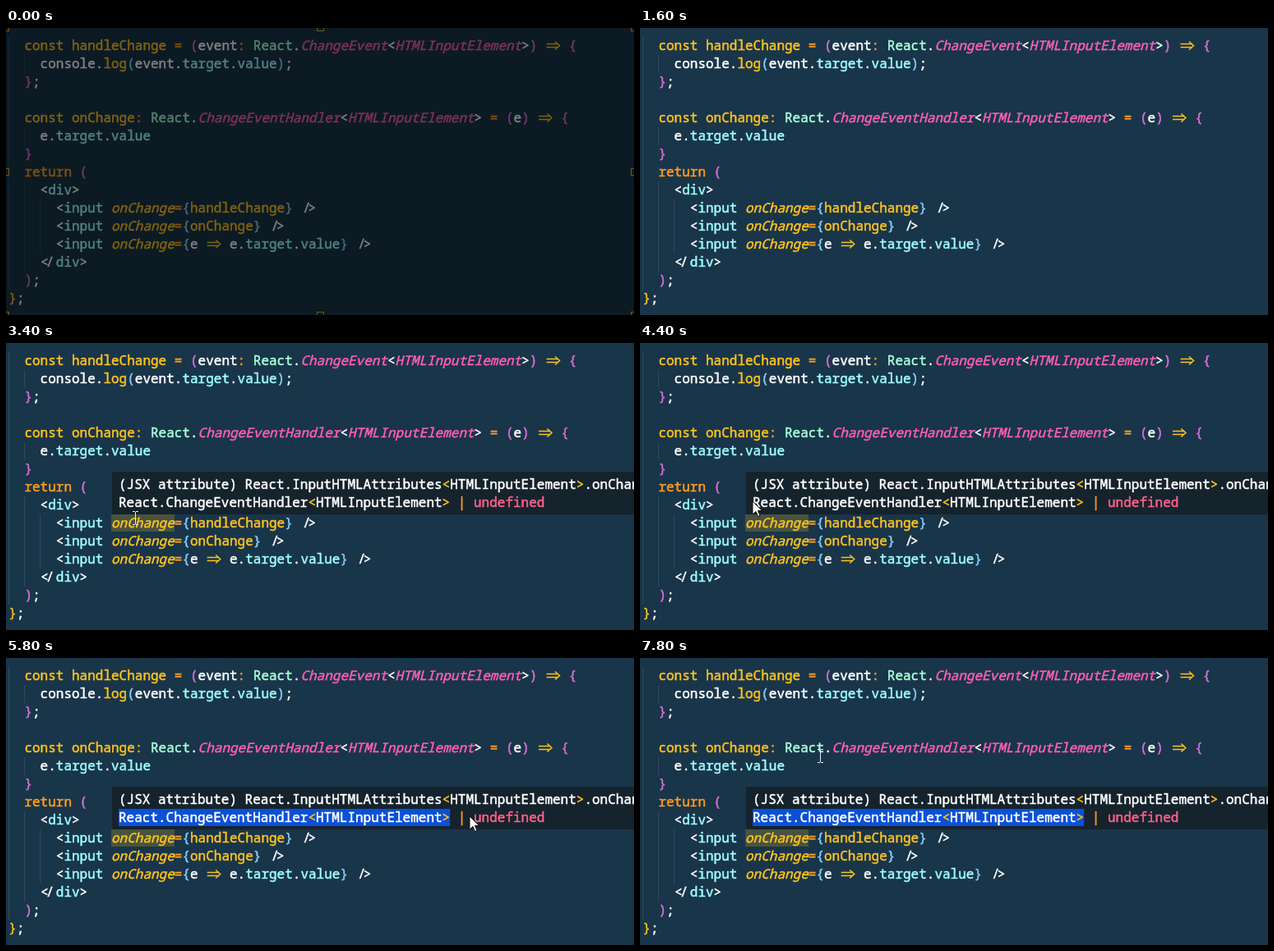
An HTML page with a canvas for the animation above (8000 ms loop, 764 by 350 pixels).

```html
<!DOCTYPE html>
<html lang="en">
<head>
<meta charset="utf-8">
<style>
html, body { margin: 0; width: 100%; height: 100%; overflow: hidden; background: #193549; }
canvas { display: block; }
</style>
</head>
<body>
<canvas id="stage" width="764" height="350"></canvas>
<script>
const ctx = document.getElementById('stage').getContext('2d');
const W = 764, H = 350, LOOP = 8000, STEP = 200;
const LEFT = 3.2, TOP = 11, CELL = 9.6, ROW = 22, BASE = 16;
const FONT = '500 16px "Noto Sans Mono", "DejaVu Sans Mono", monospace';

// Style letters used after "~" in the marked-up lines.
const COLORS = {
  w: '#ffffff', y: '#fec31e', o: '#ff9d1e', c: '#9effff', m: '#a8ffd8', p: '#da70d6',
  b: '#87cefa', t: '#fb5fb4', i: '#fec31e', r: '#ff628c'
};
const ITALIC = 'ti';

const CODE = [
  '  ~yconst handleChange ~o= ~p(~wevent~o: ~mReact~w.~tChangeEvent~w<~tHTMLInputElement~w>~p) ~y=> ~p{',
  '    ~wconsole.~ylog~b(~wevent.~ctarget~w.~cvalue~b)~w;',
  '  ~p}~w;',
  '  ',
  '  ~yconst onChange~o: ~mReact~w.~tChangeEventHandler~w<~tHTMLInputElement~w> ~o= ~p(~we~p) ~y=> ~p{',
  '    ~we.~ctarget~w.~cvalue',
  '  ~p}',
  '  ~oreturn ~p(',
  '    ~w<~cdiv~w>',
  '      ~w<~cinput ~ionChange~o=~b{~yhandleChange~b} ~w/>',
  '      ~w<~cinput ~ionChange~o=~b{~yonChange~b} ~w/>',
  '      ~w<~cinput ~ionChange~o=~b{~we ~y=> ~we.~ctarget~w.~cvalue~b} ~w/>',
  '    ~w</~cdiv~w>',
  '  ~p)~w;',
  '~y}~w;'
];
const TIP = [
  '~w(JSX attribute) React.InputHTMLAttributes~y<~wHTMLInputElement~y>~w.onChange',
  '~wReact.ChangeEventHandler~y<~wHTMLInputElement~y> ~o| ~rundefined'
];
const TIP_X = 137, TIP_Y = 162, SELECT_END = TIP_X + 42 * CELL;

const linear = u => u;
const smooth = u => u * u * (3 - 2 * u);
const easeOut = u => 1 - (1 - u) ** 2.1;

// Each move starts where the one before it ended; lift bends it upwards.
const MOVES = [
  { start: 1800, end: 2400, to: [157, 219], ease: linear },
  { start: 3200, end: 3400, to: [157, 213], ease: linear },
  { start: 3400, end: 4400, to: [137, 193], ease: easeOut },
  { start: 4600, end: 5600, to: [564, 193], ease: easeOut },
  { start: 6400, end: 7800, to: [219, 119], ease: smooth, lift: 90 }
];

function pointer(t) {
  let [x, y] = [330, 312];
  for (const { start, end, to, ease, lift = 0 } of MOVES) {
    const u = ease(Math.min(1, Math.max(0, (t - start) / (end - start))));
    x += (to[0] - x) * u;
    y += (to[1] - y) * u - lift * Math.sin(Math.PI * u);
  }
  return [x, y];
}

function rect(color, x, y, w, h) {
  ctx.fillStyle = color;
  ctx.fillRect(x, y, w, h);
}

function path(...points) {
  ctx.beginPath();
  points.forEach(([x, y]) => ctx.lineTo(x, y));
}

// A thin outline gives the text a medium weight.
function text(s, x, y) {
  ctx.lineWidth = 0.5;
  ctx.fillText(s, x, y);
  ctx.strokeText(s, x, y);
}

function arrow(x, y) {
  ctx.lineWidth = 1.5;
  for (const d of [-2, 2]) {
    path([x + 1.5, y + d], [x + 15.5, y + d]);
    ctx.stroke();
  }
  path([x + 12, y - 5], [x + 17.5, y], [x + 12, y + 5]);
  ctx.stroke();
}

function line(source, x, y) {
  for (const part of source.split(/(~\w|=>|<\/|\/>)/)) {
    if (part[0] === '~') {
      const style = part[1];
      ctx.fillStyle = ctx.strokeStyle = COLORS[style];
      ctx.font = (ITALIC.includes(style) ? 'italic ' : '') + FONT;
      continue;
    }
    if (part === '=>') {
      arrow(x, y - 5.5);
    } else if (part === '</' || part === '/>') {
      const nudge = c => c === '/' ? 2.5 : 0.5;
      text(part[0], x + nudge(part[0]), y);
      text(part[1], x + CELL - nudge(part[1]), y);
    } else {
      text(part, x, y);
    }
    x += part.length * CELL;
  }
}

function code() {
  CODE.forEach((s, i) => {
    const y = TOP + i * ROW;
    for (let col = 0; col < s.search(/\S|$/); col += 2)
      if (col < 6) rect('#31495a', Math.floor(LEFT + col * CELL), y, 1, ROW);
    line(s, LEFT, y + BASE);
  });
}

function tooltip(t) {
  ctx.globalAlpha = t < 2800 ? 0.18 : 1;
  rect('#15232d', 129, 157, W - 129, 52);
  if (t >= 4600) {
    const end = t < 5600 ? Math.min(SELECT_END, pointer(t)[0]) : SELECT_END;
    rect('#0a50d8', TIP_X, TIP_Y + ROW, end - TIP_X, 21);
  }
  TIP.forEach((s, i) => line(s, TIP_X, TIP_Y + BASE + i * ROW));
  ctx.globalAlpha = 1;
}

function drawPointer(t) {
  const [x, y] = pointer(t).map(Math.round);
  ctx.save();
  ctx.translate(x, y);
  if (t >= 3600 && t < 6800) {
    path([0, 0], [0, 16], [4, 12.5], [6.5, 18.5], [9, 17.5], [6.5, 11.5], [11.5, 11.5]);
    ctx.closePath();
    ctx.fillStyle = '#fff';
    ctx.fill();
    ctx.strokeStyle = '#111';
    ctx.lineWidth = 1;
    ctx.stroke();
  } else {
    rect('#e8edf0', 0, -7, 1, 15);
    for (const end of [-8, 8]) {
      rect('#e8edf0', -3, end, 3, 1);
      rect('#e8edf0', 1, end, 3, 1);
    }
  }
  ctx.restore();
}

function handles() {
  ctx.strokeStyle = '#f0b41e';
  ctx.lineWidth = 1;
  for (const x of [-1, W / 2, W])
    for (const y of [-1, H / 2, H])
      if (x !== W / 2 || y !== H / 2) ctx.strokeRect(x - 3.5, y - 3.5, 8, 8);
}

function draw(t) {
  rect('#193549', 0, 0, W, H);
  if (t >= 2600) rect('#48533f', 128, 209, 77, 21);
  code();
  if (t >= 2600) tooltip(t);
  if (t >= 1800) drawPointer(t);
  if (t < 400) handles();
  if (t < 200) rect('rgba(0, 0, 0, 0.5)', 0, 0, W, H);
}

function tick() {
  const t = performance.now() % LOOP;
  draw(Math.floor(t / STEP) * STEP);
  requestAnimationFrame(tick);
}
tick();
</script>
</body>
</html>
```
